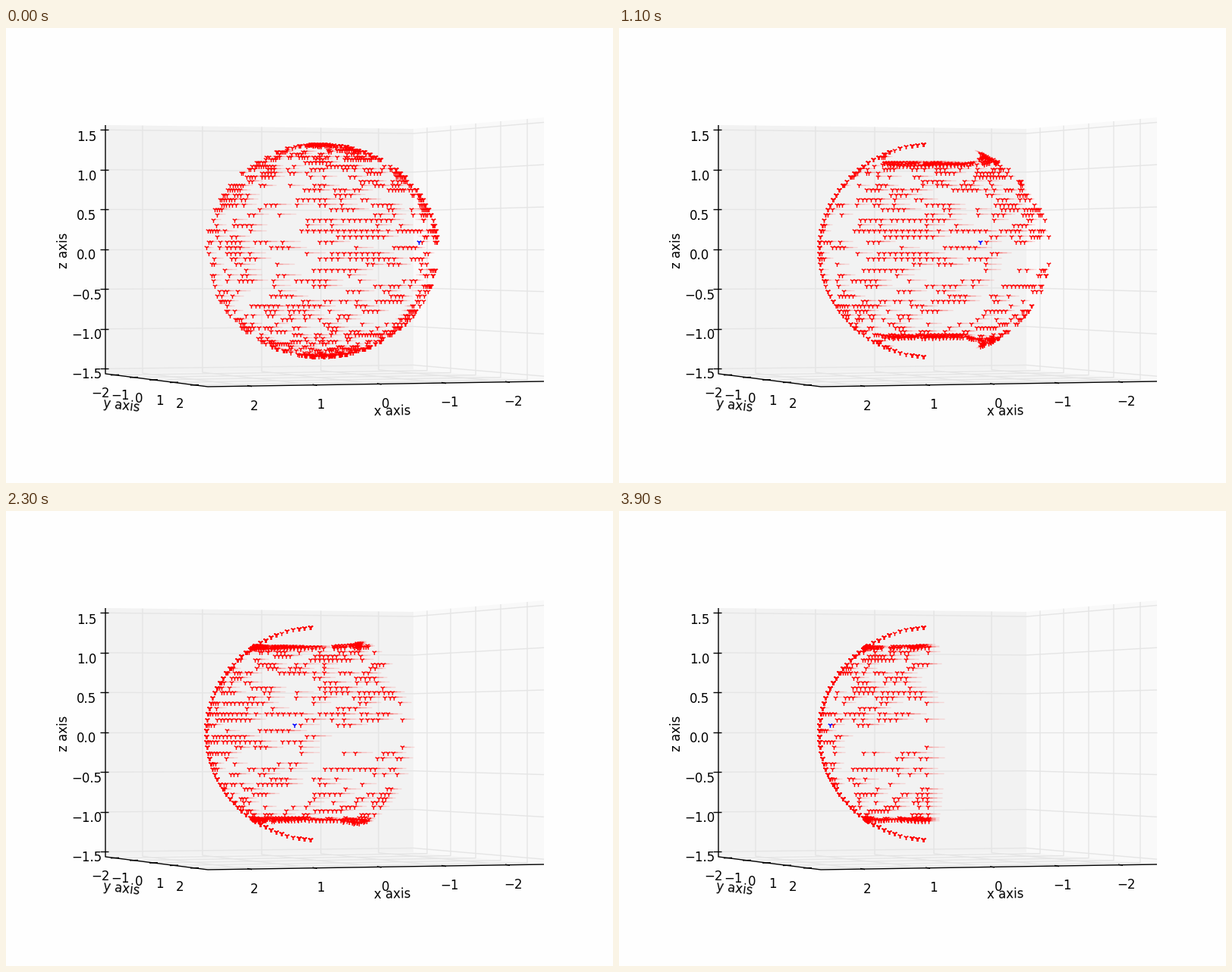
Animation, 800 px wide and 600 px high, one loop 4000 ms. Source, as a matplotlib script:

```python
import numpy as np
import matplotlib.pyplot as plt
from matplotlib.animation import FuncAnimation
from matplotlib.collections import LineCollection

FRAMES, INTERVAL = 40, 100
STEP = 3                  # degrees per frame and per grid cell
EDGE = -72                # longitude where points stop
CX, CY, RX, RY = 412.7, 293, 156.5, 140.5
MARK_LON, MARK_LAT = 57, 4.5
GRID = "#e5e5e5"

plt.rcParams["font.family"] = "DejaVu Sans"
fig = plt.figure(figsize=(8, 6), dpi=100, facecolor="#fefefe")
ax = fig.add_axes([0, 0, 1, 1])
ax.set_xlim(0, 800)
ax.set_ylim(600, 0)
ax.axis("off")


def line(points, color=GRID, width=1.0, z=2):
    ax.plot(*zip(*points), color=color, lw=width, zorder=z,
            solid_capstyle="butt")


def label(x, y, text, angle=0):
    ax.text(x, y, text, size=12, ha="center", va="baseline",
            rotation=angle, rotation_mode="anchor", zorder=9)


def along(a, b, x):
    return a[1] + (b[1] - a[1]) * (x - a[0]) / (b[0] - a[0])


def draw_box():
    top_l, top_c, top_r = (131, 128), (537, 133), (709, 118)
    low_l, low_c, low_r = (131, 456), (537, 450), (709, 466)
    front = (266, 473)
    panes = [([top_l, top_c, low_c, low_l], "#f2f2f2"),
             ([top_c, top_r, low_r, low_c], "#f9f9f9"),
             ([low_l, low_c, low_r, front], "#f5f5f5")]
    for corners, color in panes:
        ax.fill(*zip(*corners), color=color, lw=0, zorder=1)

    # x grid: back wall, then floor
    x_ticks = zip((180, 259, 337, 415, 491), (321, 407, 492, 577, 661),
                  (327, 414, 500, 585, 668), (2, 1, 0, -1, -2))
    for back, near, text_x, value in x_ticks:
        y = along(front, low_r, near)
        line([(back, along(top_l, top_c, back)),
              (back, along(low_l, low_c, back)), (near, y)])
        line([(near - 3, y - 0.6), (near + 3, y + 0.6)], "black", 1, 5)
        label(text_x, along((327, 504), (668, 498), text_x),
              str(value).replace("-", "\u2212"))

    # y grid: side wall, then floor
    y_ticks = zip((555, 586, 619, 652, 687), (143, 168, 194, 221, 248),
                  (125, 150, 175, 202, 229), (-2, -1, 0, 1, 2))
    for back, near, text_x, value in y_ticks:
        y = along(low_l, front, near)
        line([(back, along(top_c, top_r, back)),
              (back, along(low_c, low_r, back)), (near, y)])
        line([(near - 5, y + 0.2), (near + 6, y - 0.2)], "black", 1, 5)
        label(text_x, along((125, 487), (229, 501), text_x),
              str(value).replace("-", "\u2212"))

    for k in range(-3, 4):
        left = 291.8 - 52.5 * k
        line([(131, left), (537, 291.8 - 50.9 * k), (709, 291.8 - 55.8 * k)])
        line([(124, left), (135, left)], "black", 1, 5)
        label(106.5, 305.3 - 52.2 * k,
              f"{k / 2:.1f}".replace("-", "\u2212"))

    line([top_l, low_l, front, low_r], "black", 1, 5)
    label(509, 511, "x axis", 1)
    label(151.5, 503, "y axis", -7)
    label(81, 293, "z axis", 90)


def seed_points():
    """Runs of neighbouring points on a regular latitude/longitude grid."""
    rng = np.random.default_rng(12)
    lons = np.arange(EDGE, 115, STEP)
    points = []
    for lat in np.arange(-85.5, 86, STEP):
        on = rng.random() < 0.3
        row = []
        for lon in lons:
            on = rng.random() < (0.6 if on else 0.17)
            row.append(on)
        row[rng.integers(1, 8)] = True
        for lon, used in zip(lons, row):
            near_mark = lat == MARK_LAT and abs(lon - MARK_LON) < 16
            if near_mark:
                used = lon == MARK_LON + STEP
            if used:
                points.append((lon, lat))
    return np.array(points, float).T


lon0, lat0 = seed_points()
polar = np.abs(lat0) > 56
sinking = polar & (lon0 > -15)
settle = np.interp(lon0, [60, 114], [2.5, 11])
speed = np.where(polar & ~sinking,
                 np.maximum(1, 0.6 / np.cos(np.radians(lat0))), 1)


def project(lon, lat):
    lon, lat = np.radians(lon), np.radians(lat)
    return np.column_stack([CX + RX * np.cos(lat) * np.sin(lon),
                            CY - RY * np.sin(lat)])


def positions(t):
    lon = np.maximum(lon0 - STEP * speed * t, EDGE)
    fade = np.exp(-max(t, 0) / settle)
    high = np.abs(lat0)
    sunk = 52.5 + (high - 52.5) * (0.08 + 0.92 * fade)
    lat = np.sign(lat0) * np.where(sinking, sunk, high)
    return project(lon, lat)


draw_box()
trails = [LineCollection([], colors=[(1, 0, 0, alpha)], linewidths=1.0,
                         zorder=3, capstyle="butt")
          for alpha in (0.36, 0.22, 0.12)]
for trail in trails:
    ax.add_collection(trail)
heads = ax.scatter([], [], s=24, marker="1", color="red", lw=1, zorder=6)
mark = ax.scatter([], [], s=24, marker="1", color="blue", lw=1.1, zorder=7)


def update(i):
    path = [positions(i - k) for k in range(4)]
    heads.set_offsets(path[0])
    for trail, a, b in zip(trails, path, path[1:]):
        shift = np.array([0, -0.8])
        moved = np.abs(a - b).max(axis=1) > 0.05
        trail.set_segments(np.stack([a + shift, b + shift], axis=1)[moved])
    mark.set_offsets(project(np.array([MARK_LON - STEP * i]),
                             np.array([MARK_LAT])))
    return [heads, mark, *trails]


anim = FuncAnimation(fig, update, frames=FRAMES, interval=INTERVAL,
                     repeat=True, repeat_delay=0, blit=False)
plt.show()
```
